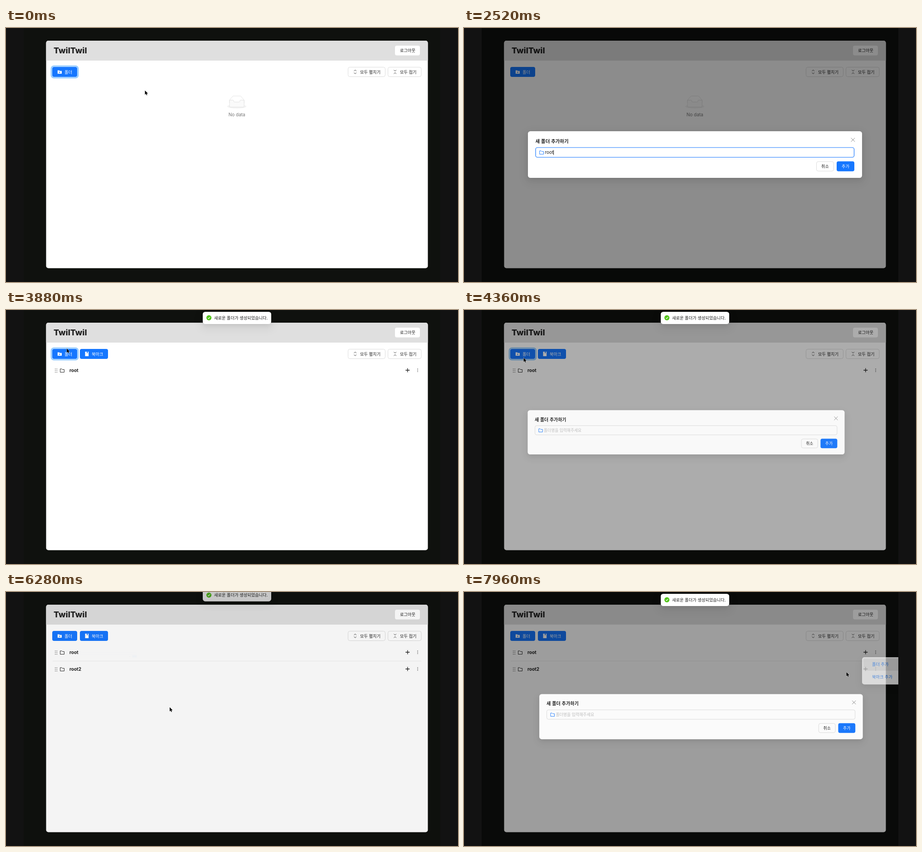
An HTML page that plays this animation: 997x561 px, repeating every 8 s.

```html
<!DOCTYPE html>
<html lang="ko">
<head>
<meta charset="utf-8">
<style>
  html, body { margin: 0; width: 100%; height: 100%; overflow: hidden; background: #121212; }
  #world { position: absolute; left: 0; top: 0; width: 997px; height: 561px; overflow: hidden; clip-path: inset(0 39px); background: #0f110e; }
  #world div, svg { position: absolute; }
  svg { left: 0; top: 0; width: 997px; height: 561px; overflow: visible; }
  text { font: 9.25px "Noto Sans CJK KR", "Noto Sans CJK", sans-serif; fill: #1f1f1f; white-space: pre; }
  .latin { font: 10px Inter, sans-serif; }
  .bold { font-weight: 700; }
  .layer { left: 0; top: 0; width: 997px; height: 561px; }
  .card { background: #fff; border-radius: 5.5px;
    box-shadow: 0 4.3px 11.5px rgba(0,0,0,.08), 0 2px 4px -3px rgba(0,0,0,.12), 0 6.5px 20px 6px rgba(0,0,0,.05); }
  #mask { background: #000; }
</style>
</head>
<body>
<div id="world">
  <svg id="page"></svg>
  <div id="mask" class="layer"></div>
  <div id="modal" class="layer">
    <div class="card" style="left:141px;top:228px;width:737px;height:102.5px"></div>
    <svg id="form"></svg>
  </div>
  <div id="menu" class="layer" style="transform-origin:878px 144px">
    <div class="card" style="left:878px;top:144px;width:112px;height:65px"></div>
    <svg id="items"></svg>
  </div>
  <div id="toast" class="layer">
    <div class="card" style="left:434px;top:4px;width:150.5px;height:27px"></div>
    <svg id="notice"></svg>
  </div>
  <svg id="cursor"><path d="M0 0V9.2L2.1 7.3L3.6 10.6L5.1 9.9L3.7 6.7H6.6Z" stroke="#fff" stroke-width=".9" paint-order="stroke"/></svg>
</div>
<script>
const LOOP = 8000, BLUE = '#1677ff', LINE = '#d9d9d9';
const $ = id => document.getElementById(id);

// Drawing helpers
const rect = (x, y, w, h, r, fill, extra = '') =>
  `<rect x="${x}" y="${y}" width="${w}" height="${h}" rx="${r}" fill="${fill}" ${extra}/>`;
const outlined = (x, y, w, h, extra = '') =>
  rect(x + .5, y + .5, w - 1, h - 1, 4, '#fff', `stroke="${LINE}" stroke-width=".9" ${extra}`);
const text = (x, y, s, extra = '') => `<text x="${x}" y="${y}" ${extra}>${s}</text>`;
const stroke = (d, color, width = 1, extra = '') =>
  `<path d="${d}" fill="none" stroke="${color}" stroke-width="${width}" ${extra}/>`;
const dot = (x, y, r = .8) => `<circle cx="${x}" cy="${y}" r="${r}" fill="#333"/>`;
const folder = (x, y, color) =>
  stroke(`M${x} ${y}h3.2l1.5 1.5h4.1v6h-8.8z`, color, .95, 'stroke-linejoin="round"');
const WHITE = 'style="fill:#fff"';

function row(y, name) {
  let handle = '';
  for (let i = 0; i < 6; i++) handle += dot(108.8 + i % 2 * 3.4, y - 2.8 + (i >> 1) * 3.6, .75);
  return handle + folder(119.6, y - 3, '#1f1f1f') + text(140, y + 3.5, name, 'class="latin bold"') +
    stroke(`M881.3 ${y}h9M885.8 ${y - 4.5}v9`, '#1f1f1f', 1.3) +
    [-3, 0, 3].map(d => dot(908, y + d)).join('');
}

$('page').innerHTML =
  rect(88.5, 28, 842, 502.5, 5, '#fff') +
  '<path d="M88.5 72V33a5 5 0 0 1 5-5H925.500a5 5 0 0 1 5 5V72Z" fill="#dfdfdf"/>' +
  text(105, 56, 'TwilTwil', 'style="font:800 18px Inter,sans-serif"') +
  rect(858, 39, 55, 21.5, 4, '#fff') + text(869, 53, '로그아웃') +
  rect(100.1, 84.1, 58.8, 25.8, 5.5, 'none', 'id="ring" stroke="#91caff" stroke-width="2.9"') +
  rect(102, 86, 55, 22, 4, BLUE) +
  '<path d="M113.800 93.500h3.400l1.300 1.300h4.400v6.200h-9.100z" fill="#fff"/>' +
  stroke('M116.8 97.900h3.2M118.400 96.300v3.200', BLUE, .9) +
  text(129, 100.5, '폴더', WHITE) +
  outlined(754, 86, 83, 22) + outlined(842, 86, 74.5, 22) +
  stroke('M767.500 95.200l2.700-2.500l2.700 2.500M767.500 98.600l2.700 2.500l2.700-2.500', '#333', .95) +
  stroke('M855.500 92.700l2.700 2.500l2.700-2.500M855.500 101.100l2.700-2.500l2.700 2.500', '#333', .95) +
  text(781, 100.5, '모두 펼치기') + text(869, 100.5, '모두 접기') +
  `<g id="empty"><g transform="translate(486.700 149.500) scale(.7)">
    <ellipse cx="32" cy="34" rx="30" ry="6.500" fill="#f3f3f3"/>
    <path d="M9 14L19 2Q20 1 21 1H43Q44 1 45 2L55 14V23H9Z" fill="#fff" stroke="${LINE}"/>
    <path d="M9 14H20Q22.400 14 22.400 17T24.600 20H39.400Q41.600 20 41.600 17T44 14H55V33Q55 36 52 36H12Q9 36 9 33Z" fill="#fafafa" stroke="${LINE}"/>
  </g>${text(509.2, 194.5, 'No data', 'class="latin" text-anchor="middle" style="fill:#777"')}</g>` +
  '<g id="list">' + rect(163, 86, 62, 22, 4, BLUE) + rect(174.5, 92, 7.7, 10, .6, '#fff') +
  `<path d="M178.300 92h2v3.800l-1-.8l-1 .8z" fill="${BLUE}"/>` +
  text(189, 100.5, '북마크', WHITE) + row(133, 'root') + '</g>' +
  '<g id="second">' + rect(103, 152, 813, 1, 0, '#ededed') + row(170, 'root2') + '</g>';

$('form').innerHTML =
  text(157.5, 253.8, '새 폴더 추가하기', 'style="font-size:10.45px;font-weight:700"') +
  stroke('M853.700 242.800l8.400 8.400M862.100 242.800l-8.400 8.400', '#888') +
  outlined(157.5, 263.5, 703.5, 22.5, 'id="field"') + folder(166.8, 271.3, BLUE) +
  text(178.5, 278.2, '폴더명을 입력해주세요', 'id="hint" style="fill:#bfbfbf"') +
  text(178.5, 278.3, '', 'id="typed" class="latin"') +
  rect(178, 269.5, .9, 11, 0, '#111', 'id="caret"') +
  '<g id="cancel">' + outlined(777, 294.5, 39, 22) + text(788, 309, '취소') + '</g>' +
  rect(822, 294.5, 39, 22, 4, BLUE, 'id="ok"') + text(833, 309, '추가', WHITE);

$('items').innerHTML =
  rect(881, 147, 106, 29, 3, '#ececec', 'id="hover"') +
  text(900, 164.8, '폴더 추가', `style="fill:${BLUE}"`) +
  text(900, 195, '북마크 추가', `style="fill:${BLUE}"`);

$('notice').innerHTML =
  '<circle cx="447.600" cy="17.200" r="5.600" fill="#52c41a"/>' +
  stroke('M445.200 17.300l1.800 1.900l3.200-3.900', '#fff', 1.2) +
  text(459, 20.5, '새로운 폴더가 생성되었습니다.');

// Easing
const clamp = v => Math.min(1, Math.max(0, v));
const bezier = (x1, y1, x2, y2) => p => {
  if (p <= 0 || p >= 1) return clamp(p);
  const at = (a, b, t) => 3 * a * t * (1 - t) ** 2 + 3 * b * t * t * (1 - t) + t ** 3;
  let lo = 0, hi = 1;
  for (let i = 0; i < 24; i++) {
    const mid = (lo + hi) / 2;
    if (at(x1, x2, mid) < p) lo = mid; else hi = mid;
  }
  return at(y1, y2, lo);
};
const outCirc = bezier(.08, .82, .17, 1), inOutCirc = bezier(.78, .14, .15, .86);
const outQuint = bezier(.23, 1, .32, 1), inQuint = bezier(.755, .05, .855, .06);
const smooth = p => p * p * (3 - 2 * p);

// Timeline
const dialogs = [
  { open: 1216, close: 2868, origin: [130, 97], word: 'root', keys: [2320, 2400, 2440, 2520] },
  { open: 4216, close: 6101, origin: [130, 97], word: 'root2', keys: [5120, 5200, 5280, 5400, 5520] },
  { open: 7790, close: 1e5, origin: [930, 148], word: '', keys: [] }
];
const toasts = [{ from: 2880, to: 5880 }, { from: 6110, to: 1e5 }];
const ringSpans = [[0, 1540], [3080, 4540], [6320, 7480]];
const cursorSpans = [[0, 2320], [3300, 5120], [6200, LOOP]];
const cursorPath = [
  [0, 306.5, 138], [519, 306.5, 138], [520, 247, 116], [680, 247, 116], [1000, 139, 98], [3400, 139, 98],
  [3840, 134, 85], [3880, 134, 85], [4120, 131.5, 105.5], [6200, 131.5, 105.5], [6280, 361, 254.5],
  [6600, 886, 132], [6900, 886, 132], [7200, 912, 160], [7840, 912, 160], [7960, 843.5, 177], [8000, 838, 178]
];
const within = (spans, t) => spans.some(([a, b]) => t >= a && t < b);
const show = (id, on) => $(id).style.display = on ? '' : 'none';

function drawDialog(t) {
  const d = dialogs.find(d => t >= d.open && t < d.close + 200);
  show('mask', d);
  show('modal', d);
  if (!d) return;
  const leaving = t >= d.close;
  $('mask').style.opacity = .45 * (leaving ? 1 - clamp((t - d.close) / 200) : clamp((t - d.open) / 200));
  const p = leaving ? 1 - inOutCirc((t - d.close) / 200) : outCirc((t - d.open - 18) / 300);
  $('modal').style.opacity = p;
  $('modal').style.transformOrigin = `${d.origin[0]}px ${d.origin[1]}px`;
  $('modal').style.transform = `scale(${.2 + .8 * p})`;

  const typed = d.word.slice(0, d.keys.filter(k => t >= k).length);
  const focused = t >= d.open + 324;
  $('typed').textContent = typed;
  show('hint', !typed);
  show('caret', focused && t < d.close - 40);
  $('caret').setAttribute('x', 178.3 + (typed ? $('typed').getComputedTextLength() : 0));
  $('field').setAttribute('stroke', focused ? BLUE : LINE);
  $('field').setAttribute('stroke-width', focused ? 1.2 : .9);

  const grow = t >= d.close - 40 ? 5.7 : 0;
  $('ok').setAttribute('x', 822 - grow);
  $('ok').setAttribute('width', 39 + grow);
  $('cancel').setAttribute('transform', `translate(${-grow} 0)`);
}

function drawToast(t) {
  const n = toasts.find(n => t >= n.from && t < n.to + 300);
  show('toast', n);
  if (!n) return;
  const out = inOutCirc((t - n.to) / 300), p = inOutCirc((t - n.from) / 300);
  $('toast').style.opacity = p * (1 - out);
  $('toast').style.transform = `translateY(${-45 * (1 - p) - 5.8 * out}px)`;
}

function drawMenu(t) {
  show('menu', t >= 6640 && t < 7990);
  const p = outQuint((t - 6640) / 200) * (1 - inQuint((t - 7790) / 200));
  $('menu').style.opacity = p;
  $('menu').style.transform = `scaleY(${.8 + .2 * p})`;
  show('hover', t >= 7080);
}

function drawCursor(t) {
  show('cursor', within(cursorSpans, t));
  const i = Math.max(1, cursorPath.findIndex(k => k[0] > t));
  const [t0, x0, y0] = cursorPath[i - 1], [t1, x1, y1] = cursorPath[i];
  const p = smooth(clamp((t - t0) / (t1 - t0)));
  $('cursor').style.transform = `translate(${x0 + (x1 - x0) * p}px, ${y0 + (y1 - y0) * p}px)`;
}

function frame() {
  const t = performance.now() % LOOP;
  show('empty', t < 2900);
  show('list', t >= 2900);
  show('second', t >= 6150);
  show('ring', within(ringSpans, t));
  drawDialog(t);
  drawToast(t);
  drawMenu(t);
  drawCursor(t);
  requestAnimationFrame(frame);
}
frame();
</script>
</body>
</html>
```
